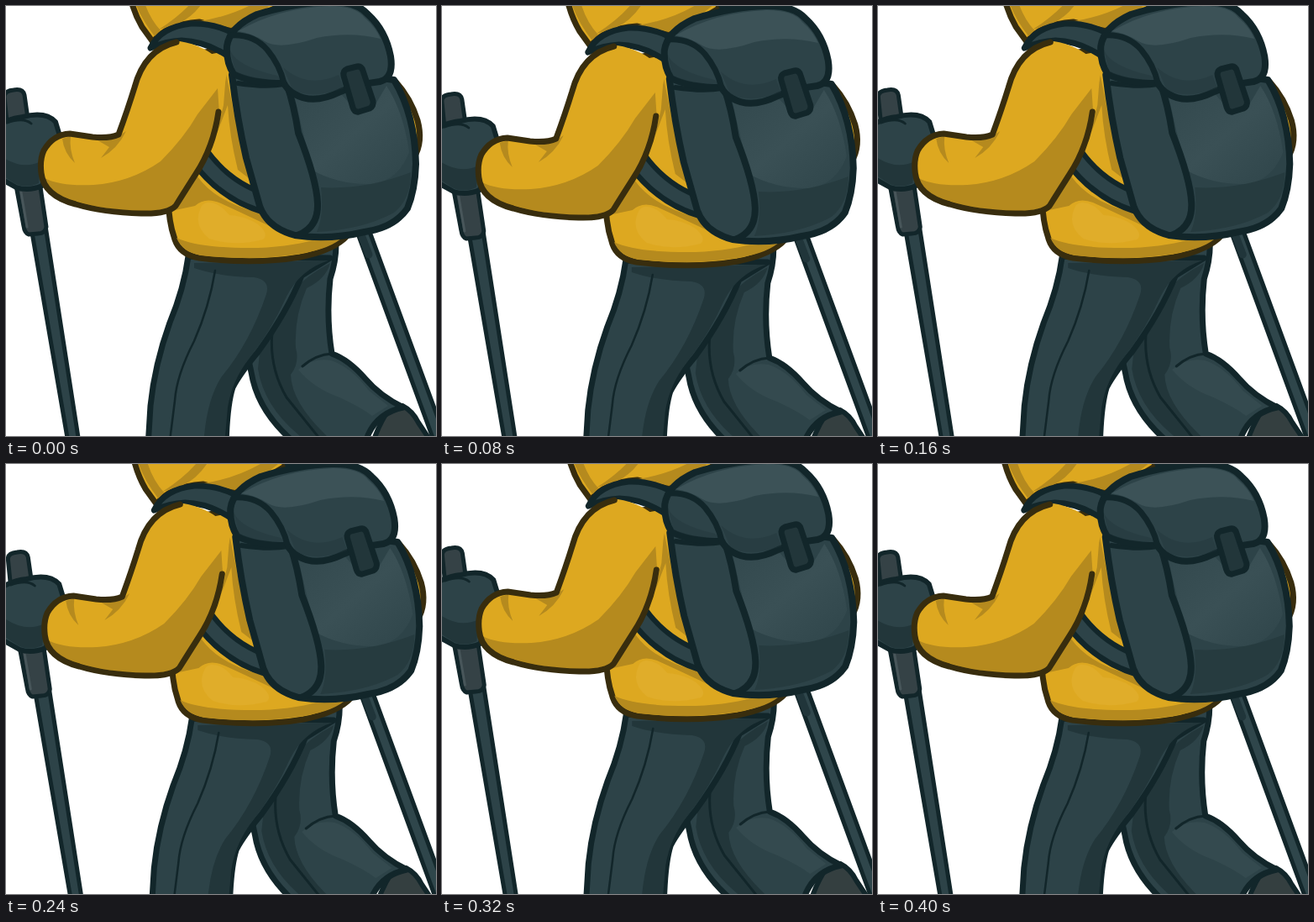
An HTML page that plays this animation: 512x512 px, repeating every 480 ms.

```html
<!DOCTYPE html>
<html>
<head>
<meta charset="utf-8">
<style>
html, body { margin: 0; width: 100%; height: 100%; overflow: hidden; background: #fff; }
svg { display: block; width: 100vw; height: 100vh; }
path { stroke-linecap: round; stroke-linejoin: round; }
.line { fill: none; stroke: #12262a; }
.teal { fill: #2d4348; stroke: #12262a; stroke-width: 7; }
.gold { fill: #dda820; }
.rim { fill: none; stroke: #382d0e; stroke-width: 7; }
.light { fill: #3c5257; }
.dark { fill: #22363a; }
.grip { fill: #354246; stroke: #12262a; stroke-width: 5; }
.shade { fill: #b58a1e; }
.glow { fill: #e0ad2a; }
</style>
</head>
<body>
<svg viewBox="0 0 512 512">
<defs>
  <linearGradient id="front" x1="0" y1="0" x2="1" y2="1">
    <stop offset="0" stop-color="#32484d"/>
    <stop offset=".5" stop-color="#3a5055"/>
    <stop offset="1" stop-color="#2f454a"/>
  </linearGradient>
</defs>
<g id="hiker">
  <!-- far pole -->
  <path class="line" stroke-width="19" d="M426 270L514 510"/>
  <path d="M426 270L514 510" stroke="#2f464b" stroke-width="9"/>
  <path d="M424 275L432 296" stroke="#20353a" stroke-width="9"/>

  <!-- far side of the jacket -->
  <path class="gold rim" style="fill:#dda820" d="M464 90Q482 110 490 136Q497 162 486 180L470 150Z"/>

  <!-- boot and back leg -->
  <path d="M436 525Q440 505 456 480L472 476Q484 482 491 496L507 520Z" fill="#343f40" stroke="#12262a" stroke-width="6"/>
  <path class="teal" d="M300 300L393 284Q393 304 386 325Q381 370 388 414Q408 421 428 444Q445 464 473 478Q443 484 431 511L426 525H350Q300 486 292 436L282 390Z"/>
  <path class="dark" d="M304 395Q330 335 386 306Q381 325 358 336Q343 370 345 407Q350 425 339 439Q340 472 382 512H350Q307 477 300 432Z"/>
  <path class="light" opacity=".5" d="M348 433Q365 418 387 422Q411 430 432 458L455 476L436 488Q423 478 397 466Q366 455 348 433Z"/>
  <path class="line" stroke-width="3" d="M317 388Q313 430 334 466L371 512M388 414Q369 415 353 429"/>

  <!-- front leg -->
  <path class="teal" d="M217 298Q212 336 195 377Q177 427 172 476L169 525H262Q263 476 270 454Q279 437 300 412Q335 364 352 321L386 300Z"/>
  <path class="dark" d="M224 306L384 303Q350 314 334 346Q315 388 290 419Q269 446 264 478L261 512H236Q240 467 257 441Q291 400 310 343Q315 326 295 323Q253 322 224 312Z"/>
  <path class="line" stroke-width="2.5" d="M249 315Q242 358 224 399Q203 440 201 470L195 518"/>

  <!-- torso -->
  <path class="gold rim" style="fill:#dda820" d="M194 225Q192 252 201 278Q207 296 230 300Q296 308 350 299Q391 291 407 273L340 120L264 50L210 60Z"/>
  <path class="shade" d="M203 276Q230 289 300 288Q345 286 375 276L402 274Q388 289 350 295Q296 304 232 297Q210 293 203 276Z"/>
  <path class="shade" d="M197 244L228 203Q250 234 304 247L318 264Q280 246 258 236Q238 226 225 238Z"/>
  <path class="glow" d="M232 240Q222 261 242 277Q272 287 306 278Q314 272 300 260Q285 250 266 249Q253 233 240 234Q234 235 232 240Z"/>
  <path class="shade" d="M262 80L272 130L289 205L276 195Q266 155 264 118L251 152L259 118Z"/>
  <path class="line" stroke-width="28" style="stroke-linecap:butt" d="M230 178Q261 221 309 235"/>
  <path d="M234 183Q263 220 304 233" fill="none" stroke="#2d4348" stroke-width="15"/>

  <!-- hood -->
  <path class="gold rim" style="fill:#dda820" d="M147 -14Q152 8 162 25L175 43Q190 22 230 19L268 29Q300 15 326 -1L335 -14Z"/>
  <path class="shade" d="M152 -10Q159 13 177 36L184 29Q170 14 163 -10ZM182 28Q210 10 226 -10H238Q225 12 205 21ZM231 18Q270 12 302 -7H322Q296 16 268 26Z"/>

  <!-- near pole and glove -->
  <path class="teal" style="stroke-width:5" d="M30 264L47 262L87 520H74Z"/>
  <path class="grip" d="M12 214L40 209L48 263Q47 271 38 271L27 272Q22 270 21 262Z"/>
  <path d="M18 222L25 263" stroke="#48565a" stroke-width="3"/>
  <path class="grip" d="M-2 108Q-2 101 9 100Q20 98 22 106L27 141L2 148Z"/>
  <path class="teal" style="stroke-width:6" d="M-20 150Q-2 134 20 132Q47 125 59 138L66 161L43 214Q27 221 12 216L-20 198Z"/>
  <path class="dark" d="M-10 176Q18 197 41 185L39 211Q23 218 10 211L-10 198Z"/>
  <path class="line" stroke-width="3" d="M1 139Q21 132 30 140"/>

  <!-- shoulder strap -->
  <path class="teal" d="M172 50Q184 25 220 21Q246 20 270 32L266 61Q239 42 209 41Q190 42 172 50Z"/>

  <!-- sleeve -->
  <path class="gold" d="M45 172Q56 153 76 152L103 156Q123 158 134 153Q145 123 153 97Q167 49 207 42Q244 48 264 76L253 126Q247 168 226 200Q212 222 202 238Q192 248 161 247Q116 246 83 236Q45 226 42 199Q40 183 45 172Z"/>
  <path class="shade" d="M46 205Q66 215 104 213Q148 210 184 185Q212 157 228 129L252 98L254 128Q245 166 224 198L202 236Q190 244 161 244Q116 243 83 232Q52 224 46 205Z"/>
  <path class="shade" d="M67 158Q69 175 82 187Q75 170 77 155ZM104 157L134 155L143 149Q133 170 113 181L123 168Z"/>
  <path class="rim" d="M253 126Q247 168 226 200Q212 222 202 238Q192 248 161 247Q116 246 83 236Q45 226 42 199Q40 183 45 172Q56 153 76 152L103 156Q123 158 134 153Q145 123 153 97Q165 52 203 43"/>

  <!-- backpack -->
  <path class="line" stroke-width="9" d="M332 -5Q348 -12 363 -4"/>
  <path class="teal" style="stroke-width:8" d="M269 82Q275 133 286 181L302 238Q311 264 344 273Q385 279 427 269Q462 264 478 241Q487 219 488 188Q487 130 462 88L340 70Z"/>
  <path fill="url(#front)" d="M344 109Q371 119 400 106L418 126L440 117L453 95Q473 125 480 174Q468 206 438 212Q395 213 364 195Z"/>
  <path class="dark" opacity=".6" d="M375 216Q428 219 482 198Q482 230 462 246Q426 266 370 269Q379 250 375 216Z"/>
  <path class="line" stroke-width="8" d="M334 92Q343 118 348 151Q370 207 371 235Q372 264 347 273"/>
  <path class="line" stroke-width="6" d="M276 92Q310 97 331 93"/>
  <path class="teal" style="stroke-width:8" d="M263 48Q266 25 299 10Q345 -4 383 -5Q417 -6 431 10Q452 29 458 60Q462 86 445 90Q419 93 398 102Q366 118 344 105Q334 99 331 92Q293 92 271 81Q262 67 263 48Z"/>
  <path class="light" d="M276 30Q325 2 385 0Q417 0 427 14Q440 25 446 39Q410 30 370 38Q326 53 308 42Q292 32 276 30Z"/>
  <path class="dark" opacity=".4" d="M267 53Q275 72 323 83L327 88Q289 88 273 78ZM330 73Q359 99 396 82L402 98Q363 112 341 99Z"/>
  <path class="line" stroke-width="7" d="M267 35Q294 33 311 52Q326 70 331 92"/>
  <path class="dark" stroke="#12262a" stroke-width="7" d="M402 83Q401 77 406 75L418 72Q423 71 425 77L437 113Q438 119 433 122L420 126Q415 127 413 121Z"/>
</g>
</svg>
<script>
const hiker = document.getElementById("hiker");
const steps = [[0, 0], [1.8, 5], [2.3, 0], [4.3, 5], [2.3, 0], [1.8, 5]];

function draw(now) {
  const [x, y] = steps[Math.floor(now / 80) % steps.length];
  hiker.setAttribute("transform", `translate(${x} ${y})`);
  requestAnimationFrame(draw);
}
draw(performance.now());
</script>
</body>
</html>
```
